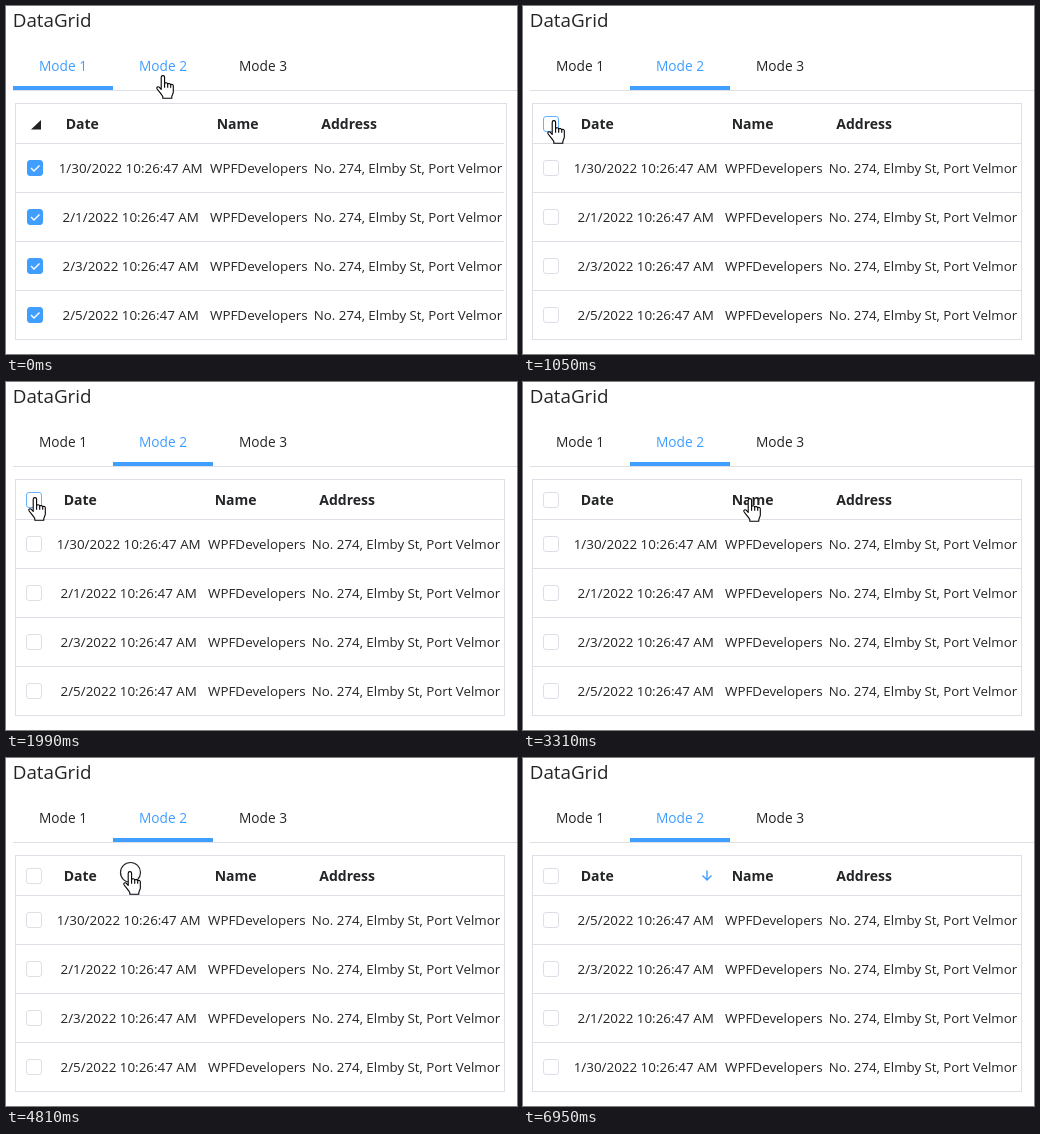
An HTML page that plays this animation: 511 px wide and 348 px high, repeating every 7.76 s.

```html
<!DOCTYPE html>
<html lang="en">
<head>
<meta charset="utf-8">
<title>DataGrid</title>
<style>
html, body { margin: 0; width: 100%; height: 100%; overflow: hidden; background: #fff; }
svg { display: block; width: 511px; height: 348px; }
text { font: 13.4px "Open Sans", "Noto Sans", sans-serif; fill: #242527; }
.title { font-size: 18.8px; }
.tab { font-size: 13.7px; }
.head { font-size: 14px; font-weight: 700; }
.address { font-size: 13.3px; }
.date, .tab { text-anchor: middle; }
.on { fill: #409eff; }
.line { fill: none; stroke: #dcdfe6; }
.box { fill: #fff; stroke: #dcdfe6; }
.box.hover { stroke: #66b1ff; }
.box.checked { fill: #409eff; stroke: #409eff; }
.tick { fill: none; stroke: #fff; stroke-width: 1.4; }
.arrow { fill: none; stroke: #409eff; stroke-width: 1.4; }
.hand { fill: #fff; stroke: #000; stroke-width: 1.1; stroke-linejoin: round; }
.ring { fill: none; stroke: #222; stroke-width: 1.2; }
</style>
</head>
<body>
<svg viewBox="0 0 511 348">
  <text class="title" x="6.7" y="21">DataGrid</text>
  <path class="line" d="M7 84.5H511"/>
  <rect id="bar" class="on" y="80" width="100" height="4"/>
  <g id="tabs"></g>
  <rect id="frame" class="line" x="9.5" y="97.5" height="236"/>
  <path id="rules" class="line"/>
  <path id="corner" d="M35 114V123.5H25Z" fill="#222"/>
  <g id="boxes"></g>
  <g id="cells">
    <text class="head" x="59.7" y="123">Date</text>
    <text class="head" x="210.7" y="123">Name</text>
    <text class="head" x="315.3" y="123">Address</text>
  </g>
  <path id="arrow" class="arrow" d="M184 122.5V113M179.5 117.5L184 113L188.5 117.5"/>
  <g id="cursor">
    <circle id="ring" class="ring" cx="7.5" cy="1.5" r="10"/>
    <path class="hand" d="M5.2 14.5V2.3a1.7 1.7 0 0 1 3.4 0v6.5a1.6 1.6 0 0 1 3.1.6a1.6 1.6 0 0 1 3 .7a1.4 1.4 0 0 1 2.6 1V17c0 2-1.5 3-1.5 5v1.3H6.8V21.5C5.5 19 2.5 16 1 13.7c-.8-1.6 1-2.6 2.2-1.5zM8.6 8.8v4M11.7 9.4v3.4M14.7 10.1v2.7"/>
  </g>
</svg>
<script>
const LOOP = 7760, STEP = 133, ROW = 49;
const SORT_UP = 4930, SORT_DOWN = 6130;
const $ = id => document.getElementById(id);
const rows = [0, 1, 2, 3];
const dates = ["1/30/2022", "2/1/2022", "2/3/2022", "2/5/2022"];

// Pointer moves, each starting where the last one ended
const legs = [
  { at: 380, steps: 6, x: 22, y: 115, power: 2.3 },
  { at: 2905, steps: 9, x: 368, y: 116, power: 2.1 },
  { at: 4137, steps: 4, x: 117, y: 113, power: 7 },
  { at: 6667, steps: 1, x: 121, y: 117, power: 1 }
];
const presses = [250, 1310, 1745, 4805, 5880, 6000];

function add(parent, tag, attrs, content = "") {
  const el = document.createElementNS("http://www.w3.org/2000/svg", tag);
  for (const key in attrs) el.setAttribute(key, attrs[key]);
  el.textContent = content;
  return $(parent).appendChild(el);
}

const tabs = [1, 2, 3].map(n =>
  add("tabs", "text", { class: "tab", x: n * 100 - 43, y: 65 }, "Mode " + n));
tabs[1].classList.add("on");

$("rules").setAttribute("d", rows.map(i => `M10 ${137.5 + i * ROW}h488`).join(""));

const dateCells = rows.map(i => {
  const y = 167 + i * ROW;
  add("cells", "text", { x: 204, y }, "WPFDevelopers");
  add("cells", "text", { class: "address", x: 307.8, y }, "No. 274, Elmby St, Port Velmor");
  return add("cells", "text", { class: "date", x: 124.7, y });
});

const addCheck = y => ({
  box: add("boxes", "rect", { class: "box", x: 21.5, y: y - 7.5, width: 15, height: 15, rx: 2.5 }),
  tick: add("boxes", "path", { class: "tick", d: `M25 ${y}l3 3l5.5-5.5` })
});
const checks = [addCheck(118), ...rows.map(i => addCheck(162 + i * ROW))];

const within = (t, from, to) => t >= from && t < to;
const show = (el, yes) => el.setAttribute("visibility", yes ? "visible" : "hidden");
const move = (el, x, y = 0) => el.setAttribute("transform", `translate(${x} ${y})`);

// Eased position, held between screen updates
function pointer(t) {
  let x = 150, y = 69;
  for (const leg of legs) {
    const done = Math.floor((t - leg.at) / STEP) / leg.steps;
    const u = Math.min(1, Math.max(0, done));
    const eased = 1 - (1 - u) ** leg.power;
    x += (leg.x - x) * eased;
    y += (leg.y - y) * eased;
  }
  return [Math.round(x), Math.round(y)];
}

function draw(t) {
  const second = t >= 250;
  const sorted = t >= SORT_DOWN;

  $("bar").setAttribute("x", second ? 107 : 7);
  tabs[0].classList.toggle("on", !second);
  $("frame").setAttribute("width", second ? 489 : 491);
  move($("cells"), second ? -2 : 0);
  move($("boxes"), second ? -1 : 0);
  show($("corner"), !second);

  checks.forEach(({ box, tick }, i) => {
    const preset = !second && i > 0;
    show(box, second || i > 0);
    box.classList.toggle("hover", i === 0 && within(t, 910, 3040));
    box.classList.toggle("checked", preset || within(t, 1450, 1870));
    show(tick, preset || within(t, 1600, 1870));
  });

  dateCells.forEach((cell, i) => {
    cell.textContent = dates[sorted ? 3 - i : i] + " 10:26:47 AM";
  });

  const shown = t - (sorted ? SORT_DOWN : SORT_UP);
  const fade = 0.4 * (Math.floor(shown / 125) + 1);
  $("arrow").setAttribute("opacity", Math.min(1, Math.max(0, fade)));
  $("arrow").setAttribute("transform", `rotate(${sorted ? 180 : 0} 184 117.5)`);

  move($("cursor"), ...pointer(t));
  $("cursor").setAttribute("opacity", t < 6950 ? 1 : 0);
  show($("ring"), presses.some(at => within(t, at, at + 125)));
}

const start = performance.now();
function tick() {
  draw((performance.now() - start) % LOOP);
  requestAnimationFrame(tick);
}
tick();
</script>
</body>
</html>
```
